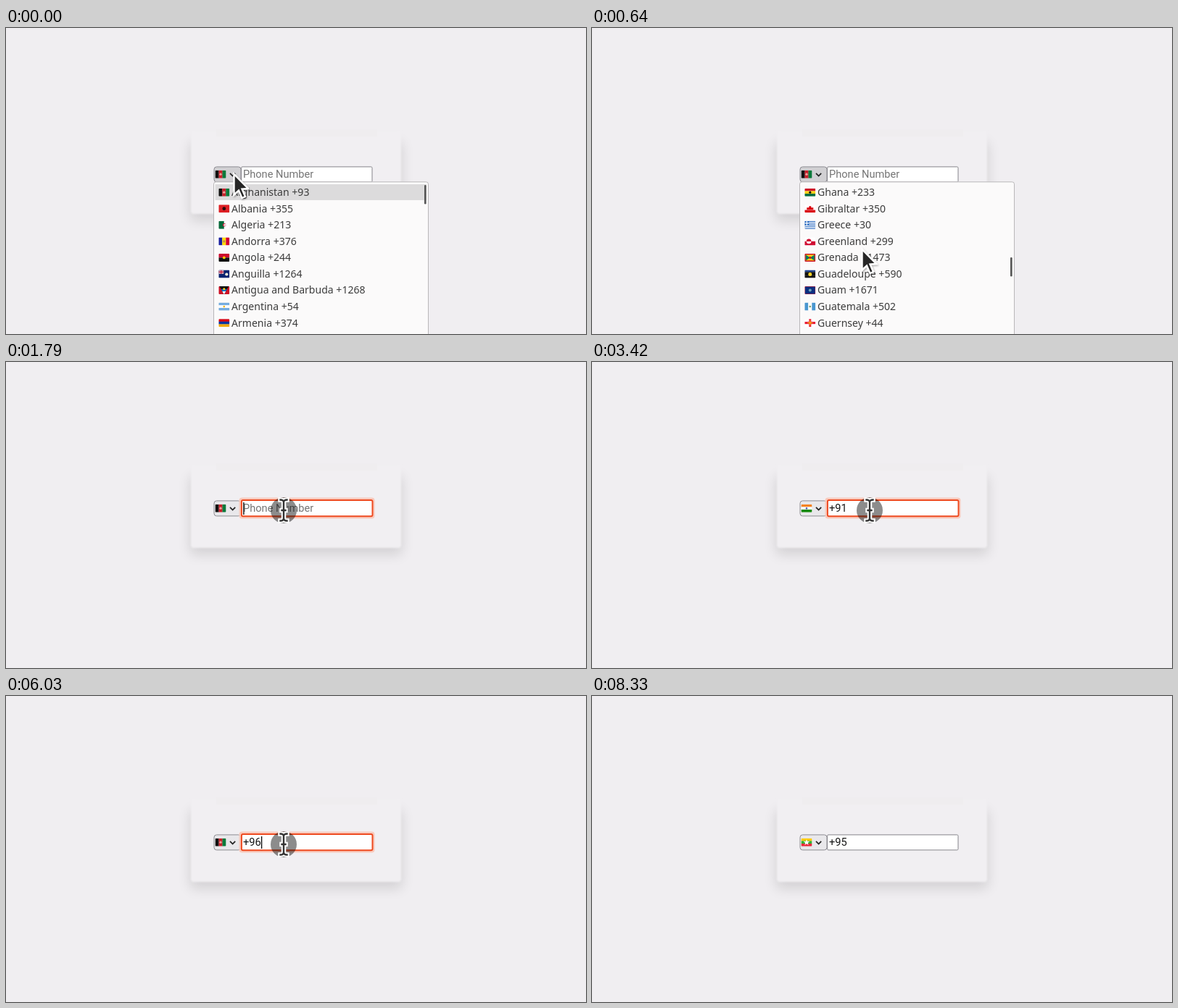
An HTML page for the animation above (8.64 s loop, 800 by 423 pixels).

```html
<!DOCTYPE html>
<html lang="en">
<head>
<meta charset="utf-8">
<title>Phone number input</title>
<style>
html, body { margin: 0; width: 100%; height: 100%; overflow: hidden; background: #f0eef1; }
svg { display: block; width: 100vw; height: 100vh; }
.field { font: 14.6px Roboto, sans-serif; }
.row { font: 14.05px "Noto Sans", "Open Sans", sans-serif; fill: #3c3c3c; }
</style>
</head>
<body>
<svg viewBox="0 0 800 423">
  <defs>
    <filter id="soft" x="-20%" y="-40%" width="140%" height="180%"><feGaussianBlur stdDeviation="8.5"/></filter>
    <filter id="edge" x="-5%" y="-10%" width="110%" height="120%"><feGaussianBlur stdDeviation="1"/></filter>
    <filter id="glow" x="-5%" y="-20%" width="110%" height="140%"><feGaussianBlur stdDeviation=".6"/></filter>
    <filter id="drop" x="-50%" y="-50%" width="200%" height="200%">
      <feDropShadow dx="1" dy="1.5" stdDeviation="1.2" flood-opacity=".35"/>
    </filter>
    <clipPath id="flagClip"><rect width="15" height="11" rx="1.2"/></clipPath>
  </defs>
  <rect width="800" height="423" fill="#f0eef1"/>
  <rect x="254" y="158" width="292" height="108" rx="4" fill="#000" opacity=".12" filter="url(#soft)"/>
  <rect x="255" y="142" width="290" height="115" rx="4" fill="#f1eff2" filter="url(#edge)"/>
  <rect x="290" y="140" width="222" height="10" fill="#efedef"/>
  <g id="scene"></g>
</svg>
<script>
const LOOP = 8640, ROW = 22.56, LIST_TOP = 216;

const countries = (
  'Afghanistan +93|Albania +355|Algeria +213|Andorra +376|Angola +244|Anguilla +1264|' +
  'Antigua and Barbuda +1268|Argentina +54|Armenia +374|Aruba +297|Australia +61|Austria +43|' +
  'Azerbaijan +994|Bahamas +1242|Bahrain +973|Bangladesh +880|Barbados +1246|Belarus +375|' +
  'Belgium +32|Belize +501|Benin +229|Bermuda +1441|Bhutan +975|Bolivia +591|Botswana +267|' +
  'Brazil +55|Bulgaria +359|Burundi +257|Cambodia +855|Cameroon +237|Canada +1|Cape Verde +238|' +
  'Chad +235|Chile +56|China +86|Colombia +57|Comoros +269|Costa Rica +506|Croatia +385|Cuba +53|' +
  'Cyprus +357|Denmark +45|Djibouti +253|Dominica +1767|Ecuador +593|Egypt +20|El Salvador +503|' +
  'Eritrea +291|Estonia +372|Ethiopia +251|Fiji +679|Finland +358|France +33|Gabon +241|' +
  'Gambia +220|Georgia +995|Germany +49|Ghana +233|Gibraltar +350|Greece +30|Greenland +299|' +
  'Grenada +1473|Guadeloupe +590|Guam +1671|Guatemala +502|Guernsey +44|Guinea +224|Guyana +592|' +
  'Haiti +509|Honduras +504|Hungary +36|Iceland +354|India +91|Indonesia +62|Iran +98|Iraq +964|' +
  'Ireland +353|Israel +972|Italy +39|Jamaica +1876|Japan +81|Jordan +962|Kenya +254|Kuwait +965|' +
  'Laos +856|Latvia +371|Lebanon +961|Lesotho +266|Liberia +231|Libya +218|Lithuania +370|' +
  'Luxembourg +352|Malawi +265|Malaysia +60|Maldives +960|Mali +223|Malta +356|Mauritius +230|' +
  'Mexico +52|Moldova +373|Monaco +377|Mongolia +976|Morocco +212|Mozambique +258|Myanmar +95|' +
  'Namibia +264|Nepal +977|Netherlands +31|New Zealand +64|Niger +227|Nigeria +234|Niue +683|' +
  'Norway +47|Oman +968|Pakistan +92|Palau +680|Palestinian Territories +970|Panama +507|' +
  'Papua New Guinea +675|Paraguay +595|Peru +51|Philippines +63|Poland +48|Portugal +351|Qatar +974'
).split('|');
const indexOf = name => countries.findIndex(c => c.startsWith(name + ' +'));
const GHANA = indexOf('Ghana'), PAKISTAN = indexOf('Pakistan');

const rect = (x, y, w, h, fill, more = '') =>
  `<rect x="${x}" y="${y}" width="${w}" height="${h}" fill="${fill}" ${more}/>`;
const disc = (x, y, r, fill) => `<circle cx="${x}" cy="${y}" r="${r}" fill="${fill}"/>`;
const poly = (points, fill) => `<polygon points="${points}" fill="${fill}"/>`;
const text = (x, y, cls, str, more = '') => `<text x="${x}" y="${y}" class="${cls}" ${more}>${str}</text>`;

// Flags live in a 15 x 11 box
const bands = (...c) => c.map((k, i) => rect(0, i * 11 / c.length, 15, 11 / c.length + .1, k)).join('');
const pales = (...c) => c.map((k, i) => rect(i * 15 / c.length, 0, 15 / c.length + .1, 11, k)).join('');
const seal = (fill, r = 1.6) => disc(7.5, 5.5, r, fill);
const hoist = fill => poly('0,0 6,5.5 0,11', fill);
const flags = {
  Afghanistan: pales('#111', '#c8202a', '#0b7a3b') + seal('#eba7a0'),
  Albania: bands('#dd1f24') + seal('#2a0b0b', 2.4),
  Algeria: pales('#07693a', '#fff') + disc(7.8, 5.5, 2.2, '#d21034') + disc(8.5, 5.5, 1.5, '#e9efe9'),
  Andorra: pales('#1a1fa0', '#fedd00', '#d50032') + seal('#b98a55'),
  Angola: bands('#cc092f', '#111') + seal('#ffcb00', 1.9),
  Anguilla: bands('#0b2370') + rect(0, 0, 7, 5.5, '#c8a0b4') + rect(3, 0, 1, 5.5, '#c8102e') +
    rect(0, 2.2, 7, 1, '#c8102e') + disc(11, 6, 2.1, '#f4f0dc'),
  'Antigua and Barbuda': bands('#ce1126') + poly('1,0 14,0 7.5,11', '#111') +
    poly('3.4,4 11.6,4 7.5,11', '#0072c6') + poly('5,7 10,7 7.5,11', '#fff') + disc(7.5, 3.6, 1.5, '#fcd116'),
  Argentina: bands('#74acdf', '#fff', '#74acdf') + seal('#f6b40e', 1.3),
  Armenia: bands('#d90012', '#0033a0', '#f2a800'),
  Ghana: bands('#ce1126', '#fcd116', '#006b3f') + seal('#111'),
  Gibraltar: bands('#fff', '#fff', '#da000c') + rect(3, 4, 9, 3, '#da000c') + rect(6, 2, 3, 3, '#da000c'),
  Greece: bands('#2b6bc0', '#fff', '#2b6bc0', '#fff', '#2b6bc0', '#fff', '#2b6bc0', '#fff', '#2b6bc0') +
    rect(0, 0, 6, 6, '#2b6bc0') + rect(2.4, 0, 1.2, 6, '#fff') + rect(0, 2.4, 6, 1.2, '#fff'),
  Greenland: bands('#fff', '#d00c33') + '<path d="M2.5 5.5a3.3 3.3 0 0 1 6.6 0z" fill="#d00c33"/>' +
    '<path d="M2.5 5.5a3.3 3.3 0 0 0 6.6 0z" fill="#fff"/>',
  Grenada: bands('#ce1126') + rect(1.5, 1.5, 12, 8, '#fcd116') + poly('1.5,1.5 7.5,5.5 1.5,9.5', '#007a5e') +
    poly('13.5,1.5 7.5,5.5 13.5,9.5', '#007a5e') + seal('#ce1126'),
  Guadeloupe: bands('#20438f', '#111', '#111', '#111') + disc(7.5, 6, 2.5, '#f5d327'),
  Guam: bands('#c62139') + rect(.6, .6, 13.8, 9.8, '#0b2f80') + seal('#6fa3b8', 2),
  Guatemala: pales('#4997d0', '#fff', '#4997d0') + seal('#7d9f6c', 1.4),
  Guernsey: bands('#fff') + rect(6, 0, 3, 11, '#e8112d') + rect(0, 4, 15, 3, '#e8112d') +
    rect(7, 2, 1, 7, '#f9dd16') + rect(4, 5, 7, 1, '#f9dd16'),
  India: bands('#f58220', '#fff', '#128807') + seal('#4a56a8', 1.3),
  Iran: bands('#239f40', '#fff', '#da0000') + seal('#da0000', 1.2),
  Myanmar: bands('#fecb00', '#34b233', '#ea2839') +
    poly('7.5,1.4 8.6,4.3 11.7,4.4 9.3,6.3 10.1,9.2 7.5,7.5 4.9,9.2 5.7,6.3 3.3,4.4 6.4,4.3', '#fff'),
  Pakistan: bands('#01411c') + rect(0, 0, 3.6, 11, '#fff') + disc(9, 5.7, 2.7, '#fff') + disc(9.9, 5, 2.3, '#01411c'),
  Palau: bands('#4aadd6') + disc(6.8, 5.5, 2.8, '#ffde00'),
  'Palestinian Territories': bands('#111', '#fff', '#149954') + hoist('#e4312b'),
  Panama: bands('#fff') + rect(7.5, 0, 7.5, 5.5, '#d21034') + rect(0, 5.5, 7.5, 5.5, '#005293') +
    disc(3.7, 2.8, 1.3, '#005293') + disc(11.2, 8.2, 1.3, '#d21034'),
  'Papua New Guinea': bands('#111') + poly('0,0 15,0 15,11', '#ce1126') +
    disc(10.6, 3.6, 1.6, '#fcd116') + disc(4, 7.6, 1, '#eee'),
  Paraguay: bands('#d52b1e', '#fff', '#0038a8') + seal('#7d9f6c', 1.3),
  Peru: pales('#d91023', '#fff', '#d91023'),
  Philippines: bands('#0038a8', '#ce1126') + hoist('#fff') + disc(2, 5.5, 1, '#fcd116'),
  Poland: bands('#f4f4f4', '#dc143c'),
  'Sri Lanka': bands('#ffbe29') + rect(1, 1, 2.2, 9, '#00534e') + rect(3.2, 1, 2.2, 9, '#eb7400') +
    rect(6.3, 1, 7.7, 9, '#8d153a') + disc(10.2, 5.5, 2, '#ffbe29')
};
const dyes = ['#ce1126', '#fff', '#1b3f94', '#fcd116', '#0b7a3b', '#111', '#4aa3df'];

// Rows that only rush past get a striped flag derived from their name
function stripes(name) {
  const seed = [...name].reduce((s, c) => (s * 31 + c.charCodeAt(0)) % 9973, 7);
  const pick = k => dyes[(seed + k) % dyes.length];
  return (seed % 2 ? bands : pales)(pick(0), pick(1 + seed % 3), pick(5));
}
const flag = (name, x, y) =>
  `<g transform="translate(${x} ${y})" clip-path="url(#flagClip)">${flags[name] || stripes(name)}</g>`;

// Keys are [time, value, value...]
function track(keys, t) {
  if (t <= keys[0][0]) return keys[0].slice(1);
  for (let i = 1; i < keys.length; i++) {
    const a = keys[i - 1], b = keys[i];
    if (t < b[0]) {
      const k = (t - a[0]) / (b[0] - a[0]);
      return a.slice(1).map((v, j) => v + (b[j + 1] - v) * k);
    }
  }
  return keys[keys.length - 1].slice(1);
}

const path = [
  [0, 313, 200], [40, 313, 200], [280, 371, 304], [1040, 371, 304], [1100, 371, 272], [1140, 370, 203],
  [1300, 370, 203], [1450, 373, 197], [1740, 383, 205], [7450, 383, 205], [7520, 557, 185.5],
  [7550, 630, 169], [7640, 790, 100], [7710, 840, 40]
];
const scroll = [[300, 0], [630, GHANA], [670, GHANA], [1000, PAKISTAN]];
const CLOSE = 1210, FOCUS = 1480, BLUR = 7870, BLINK = 530, LAG = 30;

const edits = [
  [FOCUS, ''], [2250, '+'], [2540, '+9'], [2880, '+91'], [3700, '+9'], [3940, '+'], [4030, '+9'],
  [4180, '+92'], [4970, '+9'], [5420, '+94'], [5730, '+9'], [6000, '+96'], [6180, '+9'],
  [6580, '+98'], [6730, '+9'], [7180, '+95']
];
const matches = { '+91': 'India', '+92': 'Pakistan', '+94': 'Sri Lanka', '+95': 'Myanmar', '+98': 'Iran' };

const pen = document.createElement('canvas').getContext('2d');
function caretX(value) {
  pen.font = '14.6px Roboto, sans-serif';
  return 327.2 + pen.measureText(value).width;
}

function field(t) {
  const [since, value] = edits.filter(e => e[0] <= t).pop() || [0, ''];
  const focused = t >= FOCUS && t < BLUR;
  let out = rect(287, 191.9, 37, 21, t < 1140 ? '#d1d0d3' : '#e9e8eb', 'rx="3.5" stroke="#8d8c92"') +
    flag(matches[value] || 'Afghanistan', 288.5, 196.7) +
    '<path d="M309 200.8l3.6 3.7 3.6-3.7" fill="none" stroke="#222" stroke-width="1.7"/>';
  out += focused
    ? rect(321.5, 187.4, 187, 29, '#f8cabd', 'rx="4" filter="url(#glow)"') +
      rect(324.9, 190.9, 180.6, 22.4, '#fff', 'rx="2" stroke="#ee4a20" stroke-width="2"')
    : rect(324.6, 191.9, 180.4, 21, '#fff', 'rx="1.5" stroke="#85848a"');
  out += value ? text(327, 207.4, 'field', value, 'fill="#161616"')
    : text(327, 207.4, 'field', 'Phone Number', 'fill="#757575"');
  if (focused && Math.floor((t - since) / BLINK) % 2 === 0)
    out += rect(caretX(value), 194, 1.4, 17, '#111');
  return out;
}

function popup(t, py) {
  const first = Math.floor(track(scroll, t)[0] + 1e-6);
  const hover = t > 300 && t < 1000 ? -1 : Math.max(t < 1000 ? 0 : 2, Math.floor((py - LIST_TOP) / ROW));
  let out = rect(286.5, 212.8, 296, 230, '#fbfafa', 'rx="3" stroke="#b9b7b9"');
  if (hover >= 0) out += rect(288.5, LIST_TOP + hover * ROW, 291.5, 22, '#dcdbdc');
  for (let i = 0; i < 10 && first + i < countries.length; i++) {
    const label = countries[first + i], y = 227 + i * ROW;
    out += flag(label.split(' +')[0], 293.3, y - 5.3) + text(311, y + 5.1, 'row', label);
  }
  return out + rect(577, 217 + first * 100 / GHANA, 2.6, 26.5, '#555', 'rx="1.3"');
}

// The page's own round cursor trails the pointer slightly
function ring(t) {
  if (t < 1140 + LAG || t >= BLUR) return '';
  const [x, y] = track(path, t - LAG);
  return disc(x, y, 18, 'rgba(0,0,0,.45)') + disc(x, y, 4, '#f0eef0');
}

const BEAM = 'M-4.5-14.5q4.5 0 4.5 3.5V11q0 3.5-4.5 3.5M4.5-14.5q-4.5 0-4.5 3.5V11q0 3.5 4.5 3.5M-2.5 0h5';
const ARROW = 'M1.5 2V30.5L8 24.5 12.5 35 17 33 12.5 22.5 21 22Z';

function pointer(t, x, y) {
  const at = `transform="translate(${x} ${y})"`;
  if (x > 324 && x < 505 && y > 190 && y < 214 && t > 600) {
    const stroke = (color, width) => `<path d="${BEAM}" stroke="${color}" stroke-width="${width}"/>`;
    return `<g ${at} fill="none" stroke-linecap="square">${stroke('#fff', 6.5)}${stroke('#333', 2.4)}</g>`;
  }
  return `<path ${at} d="${ARROW}" fill="#262626" stroke="#fff" stroke-width="2.4" filter="url(#drop)"/>`;
}

const scene = document.getElementById('scene');
function draw(t) {
  const [x, y] = track(path, t);
  scene.innerHTML = field(t) + ring(t) + (t < CLOSE ? popup(t, y) : '') + (x < 820 ? pointer(t, x, y) : '');
}

const start = performance.now();
function tick() {
  draw((performance.now() - start) % LOOP);
  requestAnimationFrame(tick);
}
tick();
</script>
</body>
</html>
```
